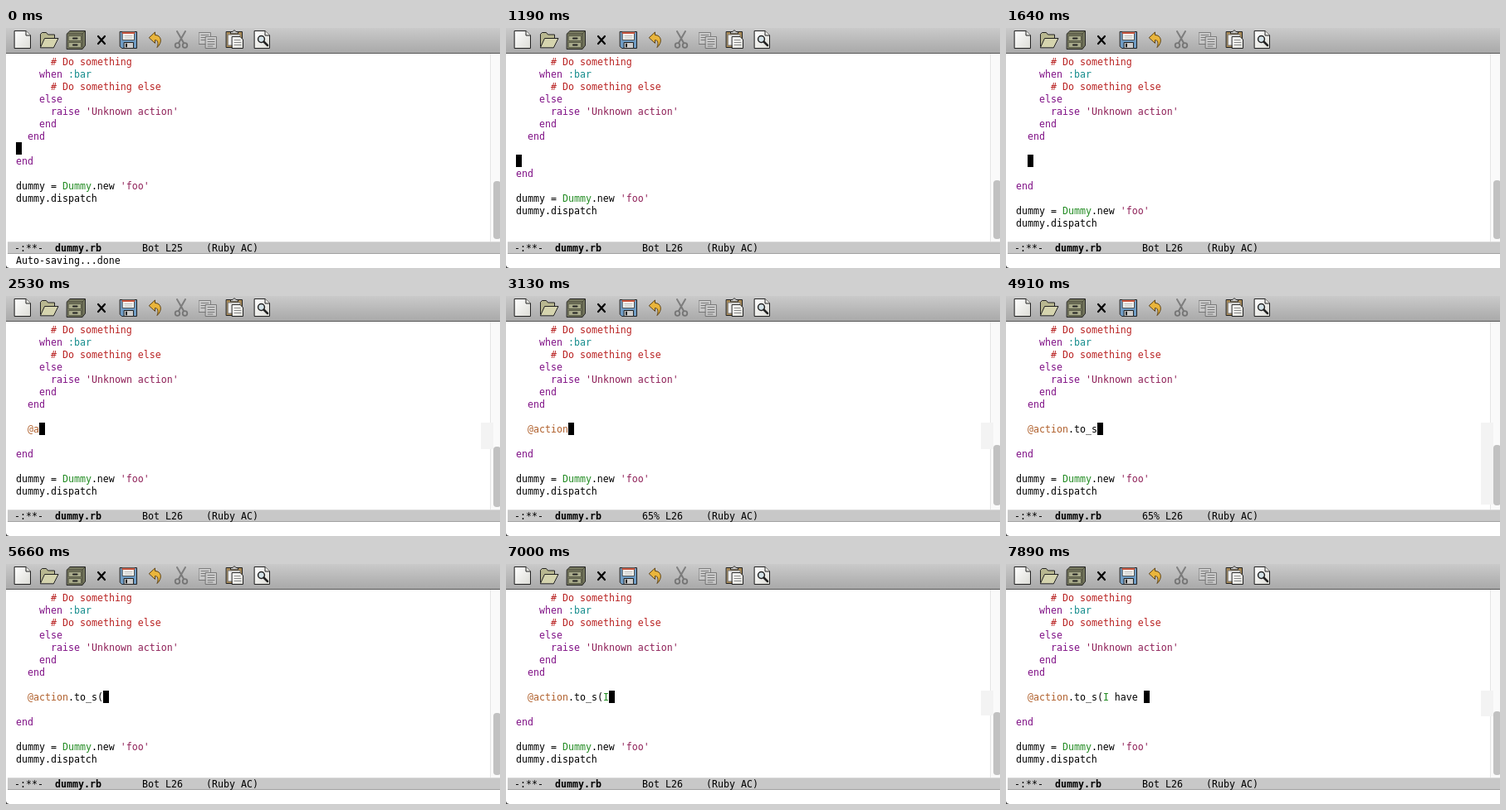
These frames come from a looping animation (595 px wide and 290 px high, 8 s). An HTML page:

```html
<!DOCTYPE html>
<html lang="en">
<head>
<meta charset="utf-8">
<title>Typing Ruby in an editor</title>
<style>
  html, body { margin: 0; width: 595px; height: 290px; overflow: hidden; background: #fff; }
  svg { display: block; }
  text { font: 11.627px "DejaVu Sans Mono", monospace; white-space: pre; fill: #000; }
  .comment { fill: #b92222; }
  .keyword { fill: #7f0f85; }
  .symbol { fill: #148c8c; }
  .string { fill: #8f2058; }
  .type { fill: #228b22; }
  .ivar { fill: #b0602c; }
  .bold { font-weight: bold; }
  .icon { stroke: #222; stroke-linejoin: round; stroke-linecap: round; }
  .faded { opacity: .42; }
</style>
</head>
<body>
<svg width="595" height="290" viewBox="0 0 595 290">
  <defs>
    <linearGradient id="bar" x2="0" y2="1">
      <stop offset="0" stop-color="#cacaca"/>
      <stop offset="1" stop-color="#a9a9a9"/>
    </linearGradient>
    <linearGradient id="paper" x2="1" y2="1">
      <stop offset="0" stop-color="#fff"/>
      <stop offset="1" stop-color="#dcdcd6"/>
    </linearGradient>
  </defs>
  <rect width="595" height="290" fill="#fff"/>

  <!-- Toolbar -->
  <rect width="595" height="30" fill="url(#bar)"/>
  <rect y="30" width="595" height="1" fill="#555"/>
  <g class="icon" fill="none">
    <!-- New file -->
    <path d="M10.5 3.5H24L29.5 9V24.5H10.5Z" fill="url(#paper)"/>
    <path d="M24 3.5V9H29.5" fill="#e8e8e4"/>
    <!-- Open -->
    <path d="M41.5 22V7.5L43.5 5.5H48.5L50.5 8H58.5V12" fill="#b9b890"/>
    <path d="M41.5 23.5L46.5 12.5H63L57.5 23.5Z" fill="#d5d4ae"/>
    <!-- Cabinet -->
    <path d="M73.5 7L77 3.5H95.5V21L92 25.5H73.5Z" fill="#77795f"/>
    <path d="M73.5 7H92L95.5 3.5M92 7V25" stroke="#4a4b3b"/>
    <path d="M75.5 9.5H90.5V15.5H75.5ZM75.5 17.5H90.5V23.5H75.5Z" fill="#a9ab8b" stroke="#5a5c48"/>
    <path d="M81 12.5H85.5M81 20.5H85.5" stroke-width="2"/>
    <!-- Close -->
    <path d="M111 10L119 19M119 10L111 19" stroke="#000" stroke-width="2.2"/>
    <!-- Save -->
    <path d="M137.5 4.5H157.5V24.5H139.5L137.5 22.5Z" fill="#6f9cc4"/>
    <path d="M140.5 4.5H154.5V14.5H140.5Z" fill="#f4f4f0" stroke="#555"/>
    <path d="M140.5 6H154.5" stroke="#c8563f" stroke-width="2"/>
    <path d="M143 9.5H152M143 12H152" stroke="#bbb"/>
    <path d="M142.5 17.5H153.5V24.5H142.5Z" fill="#ccc"/>
    <path d="M145 19.5V22.5" stroke-width="2"/>
    <!-- Undo -->
    <path d="M172.5 11.5L179.5 5V8.5C187 8.5 189 17 182 23.5C184 18 183 14.5 179.5 14.5V18Z" fill="#e9b53c" stroke="#5d4216"/>
    <!-- Cut -->
    <g class="faded">
      <path d="M206 4L214 18M216 4L208 18" stroke-width="2"/>
      <circle cx="206.5" cy="21" r="2.8" stroke-width="1.8"/>
      <circle cx="215.5" cy="21" r="2.8" stroke-width="1.8"/>
    </g>
    <!-- Copy -->
    <g class="faded">
      <path d="M232.5 5.5H246.5V19.5H232.5Z" fill="#ddd"/>
      <path d="M235 8.5H244M235 11.5H244M235 14.5H240"/>
      <path d="M240.5 10.5H253.5V24.5H240.5Z" fill="#e4e4e4"/>
      <path d="M243 13.5H251M243 16.5H251M243 19.5H251M243 22H249"/>
    </g>
    <!-- Paste -->
    <path d="M265.5 4.5H284.5V23.5H265.5Z" fill="#a98a55"/>
    <path d="M270.5 6.5V4.5H273L275 2.5L277 4.5H279.5V6.5Z" fill="#ccc"/>
    <path d="M267.5 8H282V21H267.5Z" fill="#eee" stroke="#777"/>
    <path d="M272.5 10.5H282L285.5 14V24.5H272.5Z" fill="url(#paper)"/>
    <path d="M275 14.5H282M275 17.5H283M275 20.5H283" stroke="#888"/>
    <!-- Search -->
    <path d="M299.5 3.5H312L317.5 9V24.5H299.5Z" fill="url(#paper)"/>
    <path d="M312 3.5V9H317.5" fill="#e8e8e4"/>
    <circle cx="307.5" cy="13.5" r="3.9" fill="#d5e3e8" stroke-width="1.5"/>
    <path d="M310.5 16.5L315 21" stroke-width="2.5"/>
  </g>

  <!-- Scroll bar -->
  <rect x="583" y="31" width="12" height="227" fill="#fafafa"/>
  <rect x="583" y="31" width="1" height="227" fill="#e5e5e5"/>
  <rect id="fringe" x="572" y="153" width="15" fill="#f3f3f3"/>
  <rect id="thumb" x="587" width="9" rx="4" fill="#c1c1c1"/>

  <!-- Code -->
  <text x="54" y="45" class="comment"># Do something</text>
  <text x="40" y="60"><tspan class="keyword">when</tspan> <tspan class="symbol">:bar</tspan></text>
  <text x="54" y="75" class="comment"># Do something else</text>
  <text x="40" y="90" class="keyword">else</text>
  <text x="54" y="105"><tspan class="keyword">raise</tspan> <tspan class="string">'Unknown action'</tspan></text>
  <text x="40" y="120" class="keyword">end</text>
  <text x="26" y="135" class="keyword">end</text>
  <text x="26" y="165"><tspan id="ivar"></tspan><tspan id="call"></tspan><tspan id="const" class="type"></tspan><tspan id="rest"></tspan></text>
  <g id="tail">
    <text x="12" y="165" class="keyword">end</text>
    <text x="12" y="195">dummy = <tspan class="type">Dummy</tspan>.new <tspan class="string">'foo'</tspan></text>
    <text x="12" y="210">dummy.dispatch</text>
  </g>
  <rect id="cursor" width="7" height="15"/>

  <!-- Mode line and echo area -->
  <rect x="2" y="258" width="593" height="15" fill="#c8c8c8"/>
  <rect x="2" y="258" width="593" height="1" fill="#dadada"/>
  <rect x="2" y="272" width="593" height="1" fill="#a2a2a2"/>
  <text x="10" y="270">-:**-</text>
  <text x="59" y="270" class="bold">dummy.rb</text>
  <text x="164" y="270" id="place"></text>
  <text x="241" y="270">(Ruby AC)</text>
  <text x="12" y="285" id="echo">Auto-saving...done</text>
  <path d="M0 286.5Q.5 289.5 4 290H0Z" fill="#444"/>
</svg>
<script>
  const LOOP = 8000;
  const TYPED = '@action.to_s(I have ';
  const $ = id => document.getElementById(id);

  // Each step [time, changes] builds on the one before; thumb is [top, bottom].
  let state = { on: true, row: 7, col: 0, typed: 0, shift: 0, line: 25,
                pos: 'Bot', echo: true, thumb: [185, 255], fringe: 0 };
  const steps = [
    [0, {}],
    [150, { on: false }],
    [590, { on: true }],
    [1190, { row: 8, shift: 1, line: 26, echo: false, thumb: [184, 255] }],
    [1340, { row: 9, shift: 2, line: 27 }],
    [1490, { row: 8, line: 26 }],
    [1640, { col: 2 }],
    [2080, { typed: 1, thumb: [182, 255], fringe: 34 }],
    [2530, { typed: 2, fringe: 32 }],
    [2680, { typed: 3 }],
    [2830, { typed: 4 }],
    [2980, { typed: 6 }],
    [3130, { typed: 7, pos: '65%', thumb: [180, 253] }],
    [3730, { typed: 8, pos: 'Bot', thumb: [179, 253], fringe: 99 }],
    [4030, { typed: 9 }],
    [4170, { typed: 10 }],
    [4320, { typed: 11 }],
    [4460, { pos: '65%' }],
    [4910, { typed: 12, thumb: [180, 253] }],
    [5360, { on: false }],
    [5660, { on: true, typed: 13, pos: 'Bot', thumb: [180, 255], fringe: 0 }],
    [6260, { on: false }],
    [6710, { on: true }],
    [7000, { typed: 14, thumb: [179, 255], fringe: 30 }],
    [7300, { typed: 15, thumb: [178, 255], fringe: 31 }],
    [7450, { typed: 16 }],
    [7600, { typed: 18 }],
    [7740, { typed: 19 }],
    [7890, { typed: 20 }]
  ].map(([time, change]) => ({ time, ...(state = { ...state, ...change }) }));

  function set(id, attrs) {
    for (const name in attrs) $(id).setAttribute(name, attrs[name]);
  }

  function draw(s) {
    const part = (from, to) => TYPED.slice(from, Math.min(to, s.typed));
    $('ivar').textContent = part(0, 7);
    $('call').textContent = part(7, 13);
    $('const').textContent = part(13, 14);
    $('rest').textContent = part(14, 20);
    set('ivar', { class: s.typed > 1 ? 'ivar' : '' });
    set('tail', { transform: `translate(0 ${s.shift * 15})` });
    set('cursor', {
      x: 12 + 7 * (s.col + s.typed),
      y: 33 + 15 * s.row,
      visibility: s.on ? 'visible' : 'hidden'
    });
    set('thumb', { y: s.thumb[0], height: s.thumb[1] - s.thumb[0] });
    set('fringe', { height: s.fringe });
    set('echo', { visibility: s.echo ? 'visible' : 'hidden' });
    $('place').textContent = `${s.pos} L${s.line}`;
  }

  let shown;
  function tick() {
    const time = performance.now() % LOOP;
    const step = steps.findLast(s => s.time <= time);
    if (step !== shown) draw(shown = step);
    requestAnimationFrame(tick);
  }
  tick();
</script>
</body>
</html>
```
